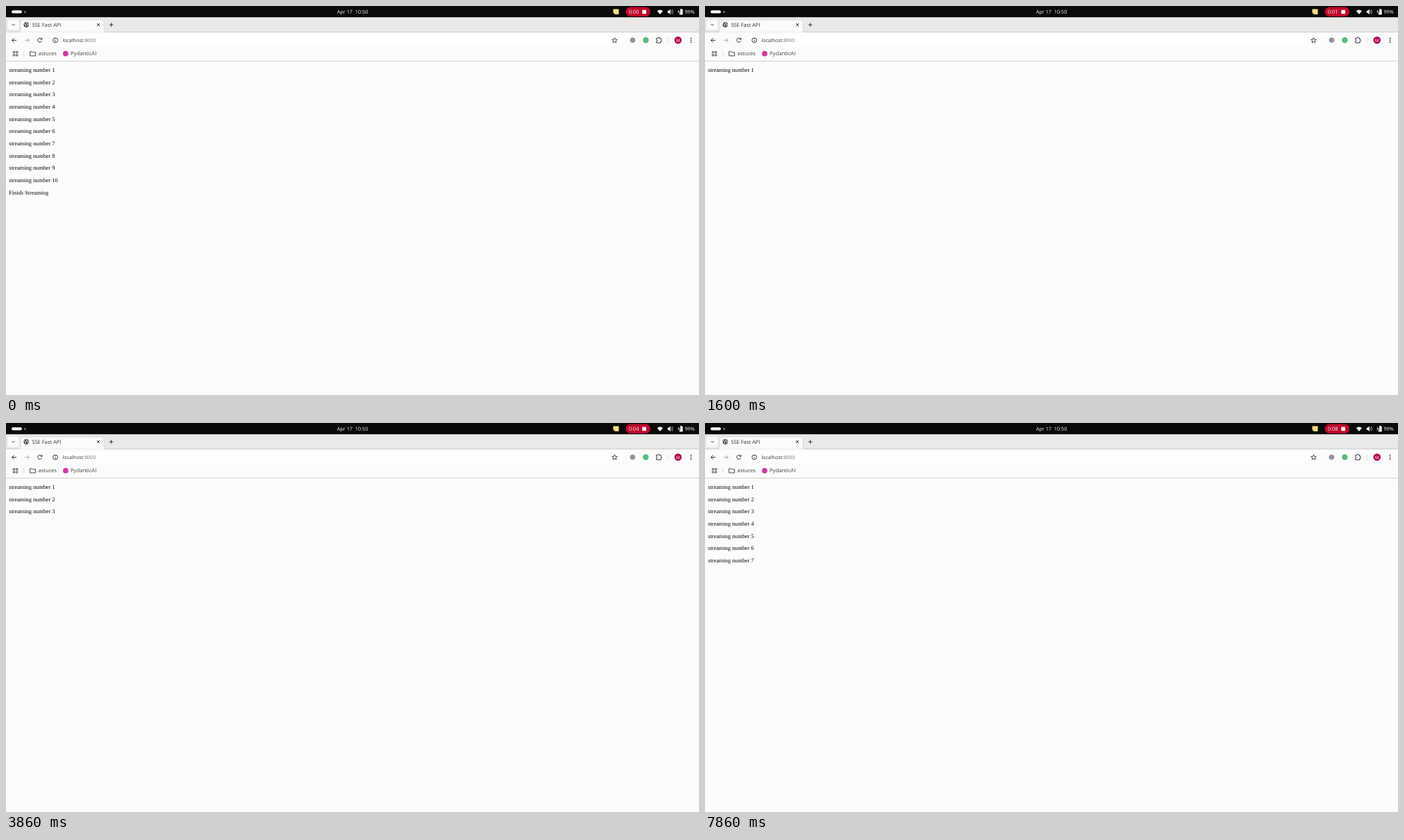
An HTML page that plays this animation: 998x561 px, repeating every 8 s.

```html
<!DOCTYPE html>
<html lang="en">
<head>
<meta charset="utf-8">
<title>SSE Fast API</title>
<style>
  html, body { margin: 0; width: 100%; height: 100%; overflow: hidden; background: #fcfcfd; }
  svg { display: block; width: 998px; height: 561px; }
  text { font: 7.5px "Open Sans", "Noto Sans", sans-serif; text-rendering: geometricPrecision; white-space: pre; }
  .page text { font: 8.317px "Liberation Serif", serif; fill: #080808; }
  .icon { fill: none; stroke: #333; stroke-width: 1; }
  .bar { fill: #f4f4f4; }
</style>
</head>
<body>
<svg viewBox="0 0 998 561">
  <rect width="998" height="561" fill="#fcfcfd"/>

  <!-- system bar -->
  <rect width="998" height="16.5" fill="#0a0a09"/>
  <g class="bar">
    <rect x="8" y="6.3" width="15" height="4.2" rx="2.1"/>
    <circle cx="27.5" cy="8.4" r="1.5" fill="#777"/>
    <text x="476.7" y="10.6" style="font-size:7.3px;font-weight:500">Apr 17  10:50</text>
    <path d="M874.5 4.5h8v7.5h-5.5l-2.5-2.5z" fill="#f7df80"/>
    <path d="M874.5 9.5h2.5v2.5z" fill="#c9a93a"/>
    <rect x="892.5" y="1.5" width="35.5" height="13.5" rx="6.75" fill="#c0082c"/>
    <text id="clock" x="896.8" y="11"></text>
    <rect x="916.3" y="5.7" width="5.6" height="5.6"/>
    <path d="M937.8 7.2q4.1-3.4 8.2 0l-4.1 4.9z"/>
    <path d="M952.8 6.8h1.7l2.3-2.3v7.8l-2.3-2.3h-1.7z"/>
    <path d="M958 6.4q1.4 2 0 4M959.3 5q2.6 3.4 0 6.8" fill="none" stroke="#bbb" stroke-width=".8"/>
    <path d="M971.3 4h2v1h1.4v7.4h-4.8v-3h1.6l-.8-1.4z"/>
    <path d="M969.2 5.2l-1.9 3.2h1.5l-.7 3 2.2-3.7h-1.5z"/>
    <text x="977.4" y="11" style="font-size:7.35px">99%</text>
  </g>

  <!-- tab strip -->
  <rect y="16.5" width="998" height="21.5" fill="#e9e9e8"/>
  <path d="M0 37.5H998" stroke="#c4c4c3" stroke-width=".8"/>
  <rect x="2.5" y="19.7" width="16" height="14.6" rx="4" fill="#fafafa"/>
  <path class="icon" d="M8.7 26.2l1.9 1.9 1.9-1.9"/>
  <path d="M17.5 38q3.5 0 3.5-3.5v-10q0-4.5 4.5-4.5h111q4.5 0 4.5 4.5v10q0 3.5 3.5 3.5z" fill="#fbfbfb" stroke="#c9c9c8" stroke-width=".6"/>
  <circle cx="29.2" cy="27.1" r="3.8" fill="#4a4d50"/>
  <path d="M26.3 25.6l2.4 1.6-.5 2.4M29.8 24l-.4 1.6 2.7.9-.8 2.2" fill="none" stroke="#f5f5f5" stroke-width="1"/>
  <text x="37.4" y="29.8" fill="#333">SSE Fast API</text>
  <path class="icon" d="M131 25l4 4m0-4l-4 4M148.8 27.1h5.6m-2.8-2.8v5.6"/>

  <!-- toolbar -->
  <rect y="38" width="998" height="41.5" fill="#fbfbfc"/>
  <path d="M0 79.5H998" stroke="#cfcfd0" stroke-width=".9"/>
  <path class="icon" d="M15 49.4H8.6m3-3l-3 3 3 3"/>
  <path class="icon" d="M27 49.4h6.4m-3-3l3 3-3 3" style="stroke:#aaa"/>
  <path class="icon" d="M51.3 47.8a3 3 0 1 0 .2 2.6M51.9 45.8v2.3h-2.4"/>
  <rect id="field" x="62.5" y="40.9" width="826.2" height="17.2" rx="8.6" fill="#fefefe" stroke-width="1.5"/>
  <circle class="icon" cx="71.1" cy="49.4" r="3.4"/>
  <path class="icon" d="M71.1 49v2.2m0-3.8v.9"/>
  <rect id="mark" x="81.3" y="44.4" width="48.8" height="9.8" fill="#dd4a26"/>
  <text x="81.4" y="52" style="font-size:7.1px"><tspan id="host">localhost</tspan><tspan id="port">:8000</tspan></text>
  <g id="lookup">
    <circle cx="808" cy="49.4" r="3.6" fill="#333"/>
    <text x="815" y="52.3" style="font-size:8.1px" fill="#111">Tavoro Scan</text>
  </g>
  <path class="icon" d="M876.5 45.7l1.1 2.5 2.7.2-2.1 1.8.7 2.7-2.4-1.5-2.4 1.5.7-2.7-2.1-1.8 2.7-.2z" style="stroke-width:.9"/>
  <circle cx="902.4" cy="49.2" r="3.8" fill="#8f9895"/>
  <circle cx="921.4" cy="49.2" r="4.2" fill="#5dbb7c"/>
  <path class="icon" d="M936.7 46.3h2.2q0-1.3 1.1-1.3t1.1 1.3h2v2.1q1.3 0 1.3 1.1t-1.3 1.1v2.4h-6.4v-2.3q1.2 0 1.2-1.1t-1.2-1.1z"/>
  <path d="M954 45v9" stroke="#dfe3ec"/>
  <circle cx="967.8" cy="49.3" r="5.3" fill="#b40a54"/>
  <text x="967.8" y="51.5" text-anchor="middle" style="font-size:6px" fill="#fff">M</text>
  <g fill="#333">
    <circle cx="986.5" cy="46.4" r=".9"/><circle cx="986.5" cy="49.3" r=".9"/><circle cx="986.5" cy="52.2" r=".9"/>
  </g>

  <!-- bookmarks -->
  <path class="icon" d="M10.4 65.6h2.2v2.2h-2.2zm4.2 0h2.2v2.2h-2.2zm-4.2 4.2h2.2v2.2h-2.2zm4.2 0h2.2v2.2h-2.2z" style="stroke-width:.8"/>
  <path d="M25.6 64.5v9" stroke="#dde0e8"/>
  <path class="icon" d="M34.6 65.8h3l1 1h4v5.1h-8z" style="stroke-width:.9"/>
  <text x="46.5" y="71.4" fill="#444">astuces</text>
  <circle cx="85.9" cy="68.7" r="3.9" fill="#cf3aa6"/>
  <text x="93" y="71.4" style="font-size:7.65px" fill="#444">PydanticAI</text>

  <g class="page" id="page"></g>
</svg>
<script>
const $ = id => document.getElementById(id);
const LOOP = 8000, FOCUS = 870, RELOAD = 1460, NEXT_LINE = 1450;

const lines = Array.from({ length: 11 }, (_, i) => {
  const line = document.createElementNS("http://www.w3.org/2000/svg", "text");
  line.textContent = i < 10 ? `streaming number ${i + 1}` : "Finish Streaming";
  line.setAttribute("x", 4.16);
  line.setAttribute("y", 95.1 + i * 17.67);
  return $("page").appendChild(line);
});

const show = (el, on) => el.setAttribute("visibility", on ? "visible" : "hidden");

function draw() {
  const t = performance.now() % LOOP;
  const focused = t >= FOCUS && t < RELOAD;
  const count = t < RELOAD ? lines.length : Math.floor((t - NEXT_LINE) / 1000) + 1;

  $("clock").textContent = `0:0${Math.floor((t + 140) / 1000)}`;
  lines.forEach((line, i) => show(line, i < count));
  show($("mark"), focused);
  show($("lookup"), focused);
  $("field").setAttribute("stroke", focused ? "#1b5cb4" : "none");
  $("host").setAttribute("fill", focused ? "#fff" : "#333");
  $("port").setAttribute("fill", focused ? "#fff" : "#777");
  requestAnimationFrame(draw);
}
draw();
</script>
</body>
</html>
```
